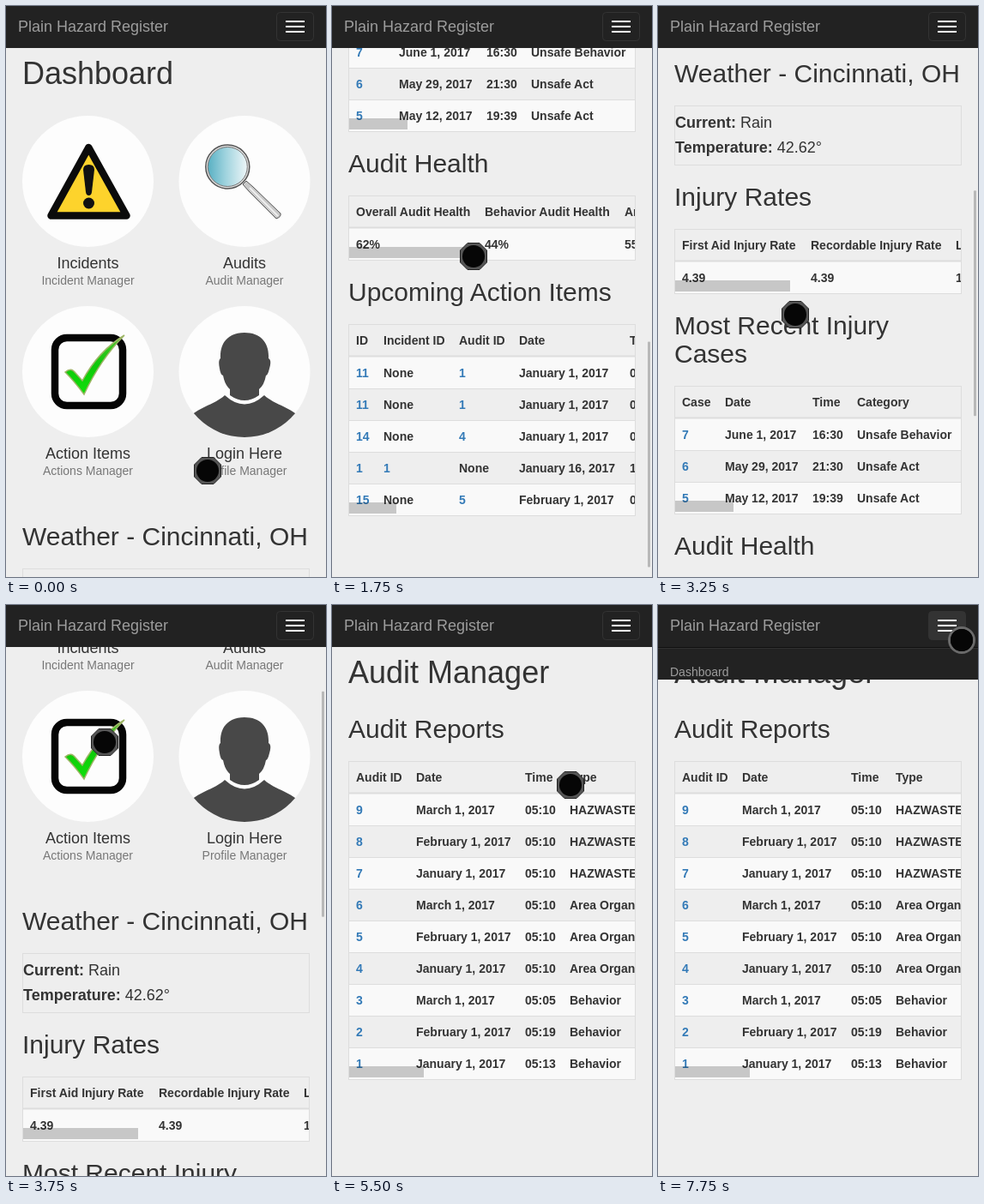
Animation, 373 px wide and 666 px high, one loop 8 s. Source, as an HTML page:

```html
<!DOCTYPE html>
<html lang="en">
<head>
<meta charset="utf-8">
<title>Dashboard</title>
<style>
  html, body { margin: 0; width: 100%; height: 100%; overflow: hidden; background: #eee; }
  svg { display: block; font-family: "Liberation Sans", Arial, sans-serif; }
</style>
</head>
<body>
<svg id="stage" width="373" height="666" viewBox="0 0 373 666">
  <defs>
    <linearGradient id="glass">
      <stop offset="0" stop-color="#58b0c3"/><stop offset=".45" stop-color="#9fd3de"/><stop offset="1" stop-color="#eef6f8"/>
    </linearGradient>
    <linearGradient id="green" x2="0" y2="1">
      <stop offset="0" stop-color="#4fc42b"/><stop offset=".5" stop-color="#0fc80a"/><stop offset="1" stop-color="#0fe00a"/>
    </linearGradient>
    <clipPath id="disc"><circle cx="278" cy="426.5" r="76.5"/></clipPath>
    <clipPath id="column"><path d="M19 0H354V1700H19z"/></clipPath>
  </defs>
  <g id="home">
    <g fill="#fdfdfd">
      <circle cx="95.5" cy="204.5" r="76.5"/><circle cx="278" cy="204.5" r="76.5"/>
      <circle cx="95.5" cy="426.5" r="76.5"/><circle cx="278" cy="426.5" r="76.5"/>
    </g>
    <path d="M96.3 165 52.5 244.5H140.5z" fill="#fdd32c" stroke="#0b0b0b" stroke-width="8.5" stroke-linejoin="round"/>
    <path d="M90 191Q90 185 96.5 185T103 191L100 217Q99.500 221 96.500 221T93 217z" fill="#111"/>
    <circle cx="96.500" cy="230" r="6.500" fill="#111"/>
    <g stroke="#555">
      <path d="M276 208 280 204 288 211 320 242Q321 246 315 248L283 216z" fill="#c9c9c9"/>
      <path d="M284 212 317 245" stroke="#eee" stroke-width="2"/>
      <circle cx="258.300" cy="187.500" r="25.500" fill="#ddd" stroke-width="1.500"/>
      <circle cx="258.300" cy="187.500" r="23" fill="url(#glass)" stroke="#777"/>
    </g>
    <rect x="57" y="387" width="79" height="79" rx="14" fill="none" stroke="#050505" stroke-width="8.500"/>
    <path d="M69 427Q76 421 81 428L89 437Q108 402 138 384Q110 412 91 453Q80 438 69 427z" fill="url(#green)" stroke="#9db565" stroke-width="1.500"/>
    <g clip-path="url(#disc)" fill="#484848">
      <path d="M278 381C297 381 307 393 306 411Q310 413 307 423Q305 431 303 431Q301 442 295 447V454Q278 466 261 454V447Q255 442 253 431Q250 430 249 423Q247 413 250 411C249 393 259 381 278 381z"/>
      <path d="M212 510V482C222 468 242 466 255 454Q278 475 301 454C314 466 334 468 344 482V510z"/>
    </g>
  </g>
  <g id="audits"></g>
  <rect id="scrollbar" x="368" width="3" height="263" rx="1" fill="#b8b8b8"/>
  <g id="nav">
    <rect id="bar" width="373" fill="#222"/>
    <rect id="toggle" x="315.5" y="7.5" width="43" height="33" rx="4" stroke="#333"/>
    <path d="M326 18H348M326 24H348M326 30H348" stroke="#fff" stroke-width="2"/>
  </g>
  <g id="menu"><path d="M0 49.500H373" stroke="#101010"/><path d="M0 50.500H373" stroke="#303030"/></g>
  <g id="cursor">
    <path id="octagon" d="M-7-15.500H7L15.500-7V7L7 15.500H-7L-15.500 7V-7z" fill="#555" stroke="#222"/>
    <circle id="ring" r="14.500" stroke="#6a6a6a" stroke-width="3"/>
    <circle r="13" fill="#060606"/>
  </g>
</svg>
<script>
const el = id => document.getElementById(id);
const add = (id, markup) => el(id).insertAdjacentHTML('beforeend', markup);

const text = (str, x, y, size, { fill = '#333', bold, middle } = {}) =>
  `<text x="${x}" y="${y}" font-size="${size}" fill="${fill}"` +
  `${bold ? ' font-weight="700"' : ''}${middle ? ' text-anchor="middle"' : ''}>${str}</text>`;

// Cells are separated by "|"; a leading "@" marks a link.
function table(top, columns, barWidth, header, rows) {
  const bottom = top + 38 + 37 * rows.length;
  const line = (y, w = 1) => `<path d="M19 ${y}H354" stroke="#ddd" stroke-width="${w}"/>`;
  const cells = (row, y) => row.split('|').map((cell, i) =>
    text(cell.replace('@', ''), columns[i], y, 14,
      { bold: true, fill: cell[0] === '@' ? '#337ab7' : '#333' })).join('');
  let out = cells(header, top + 24);
  rows.forEach((row, i) => {
    const y = top + 38 + 37 * i;
    if (i % 2 === 0) out += `<rect x="19" y="${y}" width="335" height="37" fill="#f9f9f9"/>`;
    out += (i ? line(y + .5) : line(y - .5, 2)) + cells(row, y + 24);
  });
  return `<g clip-path="url(#column)">${out}` +
    `<rect x="19.5" y="${top + .5}" width="334" height="${bottom - top}" fill="none" stroke="#ddd"/>` +
    `<rect x="20" y="${bottom - 15}" width="${barWidth}" height="13" fill="#000" fill-opacity=".2"/></g>`;
}

const tile = (x, y, title, note) =>
  text(title, x, y, 18, { middle: true }) + text(note, x, y + 19, 14, { middle: true, fill: '#777' });
const heading = (str, y) => text(str, 19, y, 30);

add('home', text('Dashboard', 19, 91, 36) +
  tile(95.5, 306, 'Incidents', 'Incident Manager') +
  tile(278, 306, 'Audits', 'Audit Manager') +
  tile(95.5, 528, 'Action Items', 'Actions Manager') +
  tile(278, 528, 'Login Here', 'Profile Manager') +
  heading('Weather - Cincinnati, OH', 629) +
  '<rect x="19.5" y="656.5" width="334" height="69" fill="none" stroke="#ddd"/>' +
  text('<tspan font-weight="700">Current:</tspan> Rain', 20, 682, 18) +
  text('<tspan font-weight="700">Temperature:</tspan> 42.62°', 20, 711, 18) +
  heading('Injury Rates', 773) +
  table(800, [28, 178, 347], 134, 'First Aid Injury Rate|Recordable Injury Rate|Lost Time', ['4.39|4.39|1.46']) +
  heading('Most Recent Injury', 923) + heading('Cases', 956) +
  table(983, [28, 78, 180, 232], 68, 'Case|Date|Time|Category', [
    '@7|June 1, 2017|16:30|Unsafe Behavior',
    '@6|May 29, 2017|21:30|Unsafe Act',
    '@5|May 12, 2017|19:39|Unsafe Act']) +
  heading('Audit Health', 1180) +
  table(1207, [28, 178, 341], 138, 'Overall Audit Health|Behavior Audit Health|Area Audit Health', ['62%|44%|55%']) +
  heading('Upcoming Action Items', 1330) +
  table(1357, [28, 60, 148, 218, 347], 55, 'ID|Incident ID|Audit ID|Date|Time', [
    '@11|None|@1|January 1, 2017|05:10',
    '@11|None|@1|January 1, 2017|05:10',
    '@14|None|@4|January 1, 2017|05:10',
    '@1|@1|None|January 16, 2017|16:30',
    '@15|None|@5|February 1, 2017|05:10']));

const months = ['January', 'February', 'March'];
const auditTimes = { 1: '05:13', 2: '05:19', 3: '05:05' };
const auditTypes = ['Behavior', 'Area Organization', 'HAZWASTE'];
const auditRows = [9, 8, 7, 6, 5, 4, 3, 2, 1].map(n =>
  `@${n}|${months[(n - 1) % 3]} 1, 2017|${auditTimes[n] || '05:10'}|${auditTypes[Math.floor((n - 1) / 3)]}`);
add('audits', text('Audit Manager', 19, 91, 36) + heading('Audit Reports', 155) +
  table(182, [28, 98, 225, 277], 87, 'Audit ID|Date|Time|Type', auditRows));

add('nav', text('Plain Hazard Register', 14, 30, 18, { fill: '#9d9d9d' }));
add('menu', text('Dashboard', 14, 83, 14, { fill: '#9d9d9d' }));

// time, scroll offset, cursor x, cursor y
const keys = [
  [0, 0, 235, 542], [1000, 400, 168, 292], [1250, 450, 175, 500], [1750, 986, 165, 292],
  [2500, 986, 150, 200], [3250, 540, 160, 360], [3750, 250, 115, 160], [4250, 0, 103, 258],
  [5000, 0, 278, 210], [5500, 0, 278, 210], [6250, 0, 135, 255], [6750, 0, 150, 245],
  [7500, 0, 352, 38], [7750, 0, 354, 41]];

function pose(t) {
  const i = Math.max(1, keys.findIndex(k => k[0] >= t));
  const a = keys[i - 1], b = keys[i];
  const u = (t - a[0]) / (b[0] - a[0]), s = u * u * (3 - 2 * u);
  return a.map((v, n) => v + (b[n] - v) * s);
}

const show = (id, on) => el(id).setAttribute('display', on ? 'inline' : 'none');

function draw() {
  const t = Math.floor(performance.now() % 8000 / 250) * 250;
  const [, scroll, x, y] = pose(t);
  const open = t >= 7750;
  show('home', t < 5500);
  show('audits', t >= 5500);
  el('home').setAttribute('transform', `translate(0 ${-Math.round(scroll)})`);
  show('scrollbar', t >= 250 && t < 4750);
  el('scrollbar').setAttribute('y', 2 + scroll * .395);
  el('bar').setAttribute('height', open ? 87 : 49);
  el('toggle').setAttribute('fill', open ? '#333' : '#222');
  show('menu', open);
  el('cursor').setAttribute('transform', `translate(${x} ${y})`);
  show('octagon', !open);
  show('ring', open);
  requestAnimationFrame(draw);
}
draw();
</script>
</body>
</html>
```
